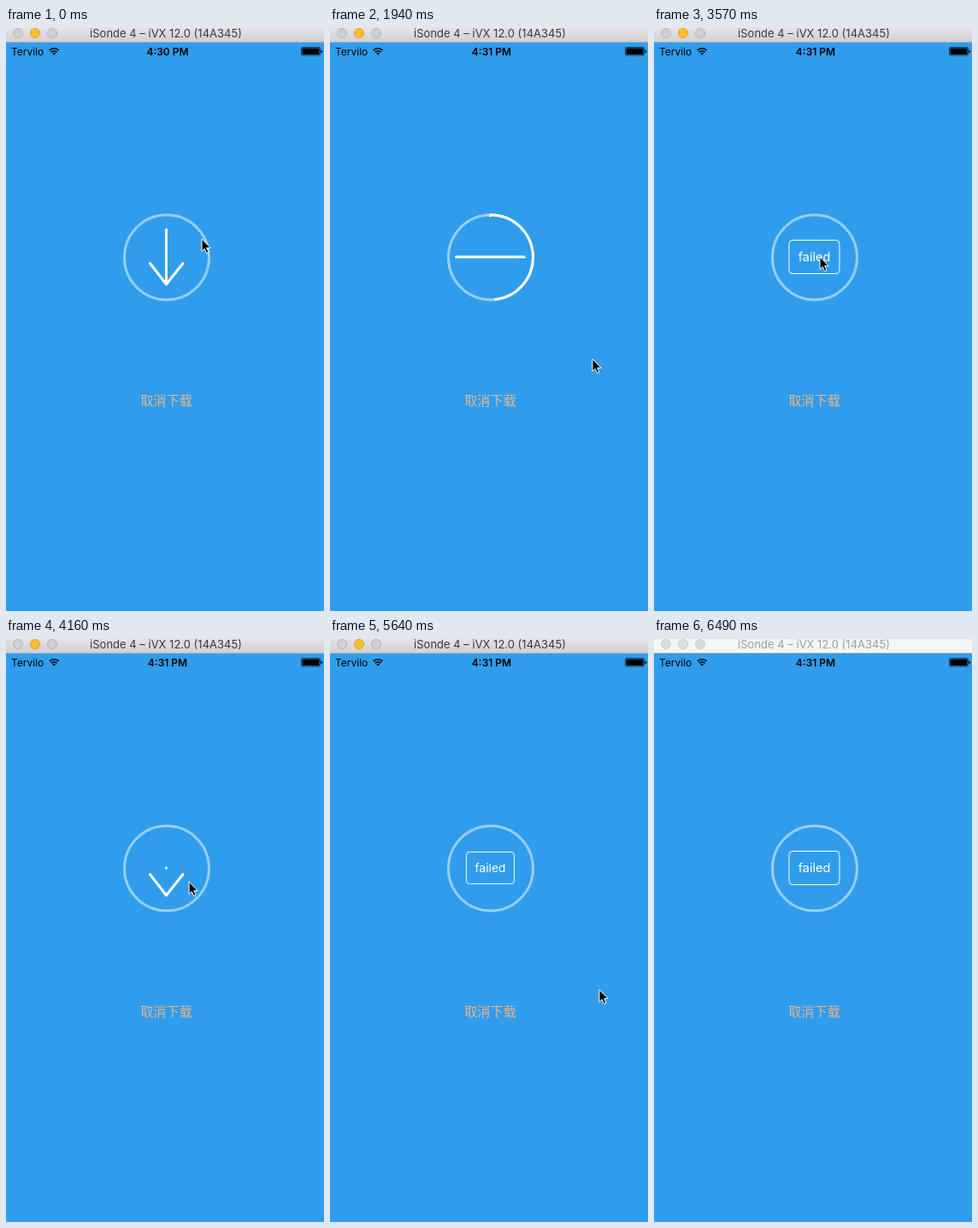
An HTML page that plays this animation: 372x680 px, repeating every 6590 ms.

```html
<!DOCTYPE html>
<html lang="zh">
<head>
<meta charset="utf-8">
<title>Download button</title>
<style>
  html, body { margin: 0; height: 100%; overflow: hidden; background: #309dec; }
  svg { display: block; width: 372px; height: 680px; font-family: Inter, "Noto Sans CJK SC", sans-serif; }
  text { text-anchor: middle; }
  .line { fill: none; stroke: #fff; stroke-width: 3; stroke-linecap: round; stroke-linejoin: round; }
  .lights circle { fill: #d0ced0; stroke: #b7b5b7; }
  .lights .amber { fill: #ffbd2e; stroke: #dea123; }
  .bar { fill: url(#chrome); }
  .title { fill: #3b3a3b; }
  .inactive .bar { fill: #f5f5f5; }
  .inactive .title { fill: #a09fa0; }
  .inactive .lights circle { fill: #dcdcdc; stroke: #cfcfcf; }
</style>
</head>
<body>
<svg viewBox="0 0 372 680">
  <defs>
    <linearGradient id="chrome" x2="0" y2="1">
      <stop stop-color="#e5e3e5"/><stop offset="1" stop-color="#d2d0d2"/>
    </linearGradient>
  </defs>
  <rect width="372" height="680" fill="#309dec"/>

  <g id="window">
    <rect class="bar" width="372" height="16"/>
    <rect y="16" width="372" height="1" fill="#a9b4bf"/>
    <g class="lights">
      <circle cx="14" cy="6" r="5.5"/><circle class="amber" cx="34" cy="6" r="5.5"/><circle cx="54" cy="6" r="5.5"/>
    </g>
    <text class="title" x="187" y="11" font-size="13">iSonde 4 – iVX 12.0 (14A345)</text>
  </g>

  <text x="6" y="31.5" font-size="12" style="text-anchor:start">Tervilo</text>
  <g fill="none" stroke="#000" stroke-width="1.7">
    <path d="M50.7 26a7.8 7.8 0 0 1 11 0M52.7 28.2a5 5 0 0 1 7 0"/>
    <path d="M56.2 31.6l-2-2a2.9 2.9 0 0 1 4 0z" fill="#000" stroke="none"/>
  </g>
  <text id="clock" x="189" y="31.5" font-size="12" font-weight="600"></text>
  <rect x="345.5" y="22.5" width="22" height="9.5" rx="1.5" fill="none" stroke="#123c5a"/>
  <rect x="346.5" y="23.5" width="20" height="7.5" rx=".5"/>
  <path d="M368.5 25.5q1.6 .4 1.6 1.8t-1.6 1.8z"/>

  <circle cx="188" cy="267.5" r="49.5" fill="none" stroke="#fff" stroke-opacity=".5" stroke-width="3"/>
  <g id="icon" class="line">
    <circle id="arc" cx="188" cy="267.5" r="49.5" pathLength="1" transform="rotate(-90 188 267.5)"/>
    <path id="shaft"/>
    <path id="head"/>
  </g>
  <g id="failed">
    <rect x="-29.5" y="-19.5" width="59" height="39" rx="4" fill="none" stroke="#fff"/>
    <text y="5.3" font-size="14.5" fill="#fff">failed</text>
  </g>
  <text x="187.5" y="440" font-size="15.2" fill="#e6b48c">取消下载</text>

  <path id="cursor" d="M0 0V14.4L3.2 11.4 5.6 16.6 8 15.5 5.7 10.5H10.2z" stroke="#fff" stroke-linejoin="round"/>
</svg>
<script>
const LOOP = 6590, STEP = 148;
const RUNS = [{ from: 0, start: 600, fail: 2240 }, { from: 3660, start: 3856, fail: 5390 }];
const CLOCK_TICK = 600, BLUR = 6200;
// time, x, y
const CURSOR = [
  [0, 229, 246], [450, 229, 246], [888, 275, 387], [1184, 307, 386], [2600, 307, 386],
  [3400, 194, 267], [3860, 194, 267], [4440, 235, 300], [4736, 235, 300],
  [5250, 315, 409], [5630, 315, 409], [5772, 329, 600], [5910, 335, 700], [LOOP, 335, 700]
];

const $ = id => document.getElementById(id);
const mix = (a, b, k) => a + (b - a) * k;
const ramp = (t, a, b) => Math.min(1, Math.max(0, (t - a) / (b - a)));
const easeOut = (k, n = 2) => 1 - (1 - k) ** n;
const smooth = k => k * k * (3 - 2 * k);
const show = (el, on) => el.setAttribute("display", on ? "inline" : "none");

function drawCursor(t) {
  const i = CURSOR.findIndex(p => p[0] > t);
  const [t0, x0, y0] = CURSOR[i - 1], [t1, x1, y1] = CURSOR[i];
  const k = ramp(t, t0, t1);
  $("cursor").setAttribute("transform", `translate(${mix(x0, x1, k)} ${mix(y0, y1, k)})`);
}

function drawIcon(s) {
  // the shaft shrinks to a dot, which jumps to the rim and settles
  const shrink = smooth(ramp(s, 0, 280));
  const lift = mix(0, -53, easeOut(ramp(s, 560, 735))) + 5 * smooth(ramp(s, 735, 870));
  $("shaft").setAttribute("d", `M187.5 ${mix(235, 267, shrink) + lift}V${mix(298, 267, shrink) + lift + .01}`);

  const flat = smooth(ramp(s, 290, 580));
  const y = mix(274.5, 267, flat);
  $("head").setAttribute("d",
    `M${mix(168.5, 147.5, flat)} ${y}L187.5 ${mix(299, 267, flat)} ${mix(207, 227.5, flat)} ${y}`);

  show($("arc"), s > 890);
  $("arc").setAttribute("stroke-dasharray", `${ramp(s, 880, 1800)} 2`);
}

function draw(now) {
  const t = Math.floor((now % LOOP) / STEP) * STEP;
  const run = RUNS[t < RUNS[1].from ? 0 : 1];
  const failed = t > run.fail;
  show($("icon"), !failed);
  show($("failed"), failed);
  if (failed) {
    const scale = easeOut(ramp(t, run.fail, run.fail + 270), 1.5);
    $("failed").setAttribute("transform", `translate(187.5 267) scale(${scale})`);
  } else drawIcon(t - run.start);
  drawCursor(t);
  $("clock").textContent = t < CLOCK_TICK ? "4:30 PM" : "4:31 PM";
  $("window").setAttribute("class", t > BLUR ? "inactive" : "");
}

const begin = performance.now();
(function tick() {
  draw(performance.now() - begin);
  requestAnimationFrame(tick);
})();
</script>
</body>
</html>
```
